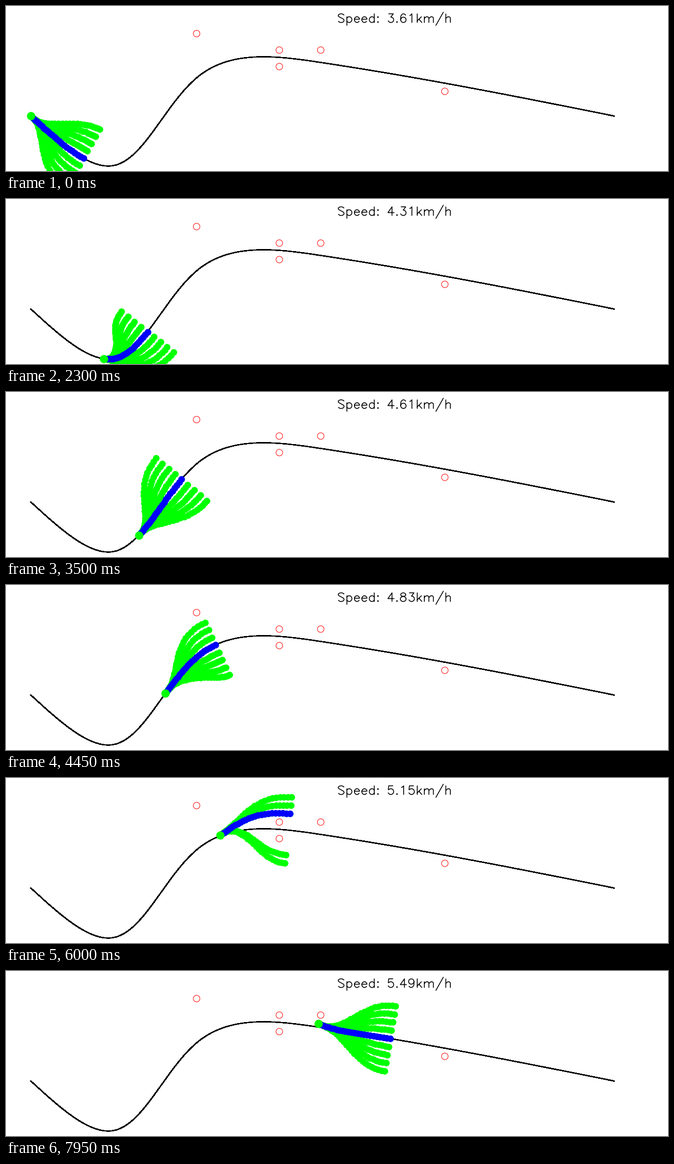
Write a matplotlib script that moves like this. It is 1280x320 px and loops after 8000 ms.

```python
"""Frenet-frame path planner driving along a spline course past obstacles."""
import math

import matplotlib.pyplot as plt
import numpy as np
from matplotlib.animation import FuncAnimation
from numpy.polynomial import Polynomial

W, H, DPI = 1280, 320, 100
FRAMES, INTERVAL = 160, 50
SCALE = 16                      # pixels per metre
ORIGIN = (48, 213.4)

DT, HORIZON = 0.2, 5.0          # seconds
START_SPEED, TARGET_SPEED = 1.0, 2.0
OFFSETS = range(-4, 5)          # lateral targets in metres
CLEARANCE = 1.0
JERK_WEIGHT = 0.1

WAYPOINTS = np.array([(0, 0), (10, -6), (20.5, 5), (35, 6.5), (70.5, 0)])
OBSTACLES = np.array([(20, 10), (30, 6), (30, 8), (35, 8), (50, 3)])
TIMES = np.arange(25) * DT


# ---- course ----

class Course:
    """Natural cubic spline through points, parametrised by chord length."""

    def __init__(self, points):
        h = np.hypot(*np.diff(points, axis=0).T)
        self.knots = np.concatenate([[0], np.cumsum(h)])
        n = len(points)
        slope = np.diff(points, axis=0) / h[:, None]
        m = np.eye(n)
        rhs = np.zeros((n, 2))
        for i in range(1, n - 1):
            m[i, i - 1:i + 2] = h[i - 1], 2 * (h[i - 1] + h[i]), h[i]
            rhs[i] = 3 * (slope[i] - slope[i - 1])
        self.a = points
        self.c = np.linalg.solve(m, rhs)
        self.b = slope - h[:, None] * (2 * self.c[:-1] + self.c[1:]) / 3
        self.d = np.diff(self.c, axis=0) / (3 * h[:, None])

    def at(self, s, offset=0.0):
        """Points at distance s, shifted to the left by offset."""
        i = np.clip(np.searchsorted(self.knots, s, side="right") - 1,
                    0, len(self.b) - 1)
        u = (s - self.knots[i])[:, None]
        a, b, c, d = self.a[i], self.b[i], self.c[i], self.d[i]
        pos = a + u * (b + u * (c + u * d))
        tangent = b + u * (2 * c + 3 * u * d)
        yaw = np.arctan2(tangent[:, 1], tangent[:, 0])
        normal = np.column_stack([-np.sin(yaw), np.cos(yaw)])
        return pos + normal * np.reshape(offset, (-1, 1))


# ---- planner ----

def lateral_poly(d, vel, acc, goal):
    """Quintic from the current lateral state to rest at goal."""
    t = HORIZON
    m = [[t**3, t**4, t**5],
         [3 * t**2, 4 * t**3, 5 * t**4],
         [6 * t, 12 * t**2, 20 * t**3]]
    rhs = [goal - d - vel * t - acc * t * t / 2, -vel - acc * t, -acc]
    return Polynomial([d, vel, acc / 2, *np.linalg.solve(m, rhs)])


def forward_poly(s, speed):
    """Quartic that reaches the target speed at the horizon."""
    gain = TARGET_SPEED - speed
    return Polynomial([s, speed, 0, gain / HORIZON**2, -gain / (2 * HORIZON**3)])


def is_free(path):
    gaps = np.linalg.norm(path[:, None] - OBSTACLES, axis=2)
    return gaps.min() > CLEARANCE


def plan(course, s, speed, lateral):
    """Return the forward curve, the best lateral curve and all free paths."""
    forward = forward_poly(s, speed)
    stations = forward(TIMES)
    options = []
    for goal in OFFSETS:
        poly = lateral_poly(*lateral, goal)
        shift = poly(TIMES)
        path = course.at(stations, shift)
        if is_free(path):
            jerk = np.sum(poly.deriv(3)(TIMES) ** 2)
            cost = JERK_WEIGHT * jerk + shift[-1] ** 2
            # equal costs go to the left-hand path
            options.append((round(cost, 6), -goal, poly, path))
    best = min(options, key=lambda o: o[:2])
    return forward, best[2], best[3], [o[3] for o in options]


def simulate(course):
    s, speed, lateral = 0.0, START_SPEED, (0.0, 0.0, 0.0)
    steps = []
    for _ in range(FRAMES):
        forward, side, best, paths = plan(course, s, speed, lateral)
        s, speed = forward(DT), forward.deriv()(DT)
        lateral = side(DT), side.deriv()(DT), side.deriv(2)(DT)
        steps.append((best, np.vstack(paths), speed * 3.6))
    return steps


# ---- stroke lettering ----

def arc(cx, cy, rx, ry, start, end):
    a = np.radians(np.linspace(start, end, 15))
    return list(zip(cx + rx * np.cos(a), cy + ry * np.sin(a)))


def turned(strokes):
    return [[(20 - x, 21 - y) for x, y in stroke] for stroke in strokes]


def hump(x):
    return [(x, 10)] + arc(x + 6.5, 10, 4.5, 4, 135, 0) + [(x + 11, 0)]


def dot(y):
    return [(5, y + 1), (4, y), (5, y - 1), (6, y), (5, y + 1)]


SIX = [arc(10.7, 12, 6.7, 9, 40, 180) + arc(10.5, 6.5, 6.5, 6.5, 180, 540)]

# character: (advance, strokes)
GLYPHS = {
    " ": (16, []),
    ".": (10, [dot(1)]),
    ":": (10, [dot(13), dot(1)]),
    "/": (22, [[(20, 25), (2, -7)]]),
    "S": (20, [arc(10, 16.8, 7, 4.2, 17, 235) + arc(10, 5, 7, 5, 55, -155)]),
    "p": (19, [[(4, 14), (4, -7)], arc(9.5, 7, 6.5, 7, 148, -148)]),
    "e": (18, [[(3, 8), (15, 8)] + arc(9.3, 7, 6.3, 7, 8, 325)]),
    "d": (19, [[(15, 21), (15, 0)], arc(9.5, 7, 6.5, 7, 32, 328)]),
    "k": (17, [[(4, 21), (4, 0)], [(14, 14), (4, 4)], [(8, 8), (15, 0)]]),
    "m": (30, [[(4, 14), (4, 0)], hump(4), hump(15)]),
    "h": (19, [[(4, 21), (4, 0)], hump(4)]),
    "0": (20, [arc(10, 10.5, 7, 10.5, 0, 360)]),
    "1": (20, [[(6, 17), (8, 18), (11, 21), (11, 0)]]),
    "2": (20, [arc(10, 16, 6, 5, 180, -35) + [(3, 0), (17, 0)]]),
    "3": (20, [[(5, 21), (16, 21), (10, 13)]
               + arc(10.2, 6.5, 6.8, 6.5, 70, -158)]),
    "4": (20, [[(13, 0), (13, 21), (3, 7), (18, 7)]]),
    "5": (20, [[(15, 21), (5, 21), (4, 12)] + arc(10.1, 7, 6.9, 7, 140, -155)]),
    "6": (20, SIX),
    "7": (20, [[(3, 21), (17, 21), (7, 0)]]),
    "8": (20, [arc(10, 16.6, 6, 4.4, 0, 360), arc(10, 6.1, 7, 6.1, 0, 360)]),
    "9": (20, turned(SIX)),
}


def lettering(text, x, y, size):
    """One polyline for the text, with gaps between the strokes."""
    points = []
    for char in text:
        advance, strokes = GLYPHS[char]
        for stroke in strokes:
            points += [(x + px * size, y - py * size) for px, py in stroke]
            points.append((math.nan, math.nan))
        x += advance * size
    return np.array(points)


# ---- drawing ----

def px(width):
    return width * 72 / DPI


def to_screen(points):
    return np.asarray(points) * (SCALE, -SCALE) + ORIGIN


fig = plt.figure(figsize=(W / DPI, H / DPI), dpi=DPI, facecolor="white")
ax = fig.add_axes([0, 0, 1, 1])
ax.set(xlim=(0, W), ylim=(H, 0))
ax.axis("off")


def dots(color, diameter, z):
    return ax.plot([], [], "o", color=color, ms=px(diameter), mew=0,
                   antialiased=False, zorder=z)[0]


course = Course(WAYPOINTS)
steps = simulate(course)

ax.plot(*to_screen(course.at(np.arange(0, course.knots[-1], 0.1))).T,
        color="black", lw=px(1.6), antialiased=False, zorder=1)
ax.plot(*to_screen(OBSTACLES).T, "o", mfc="none", mec="red",
        ms=px(12.8), mew=px(1), zorder=5)

fan = dots("lime", 12.8, 2)
chosen = dots("blue", 12.8, 3)
car = dots("lime", 16, 4)
label, = ax.plot([], [], color="black", lw=px(1.6), zorder=6,
                 solid_capstyle="round", solid_joinstyle="round")


def draw(i):
    best, paths, speed = steps[i]
    fan.set_data(*to_screen(paths).T)
    chosen.set_data(*to_screen(best).T)
    car.set_data(*to_screen(best[:1]).T)
    shown = math.floor(speed * 100) / 100
    label.set_data(*lettering(f"Speed: {shown:.2f}km/h", W / 2, 32, 0.8).T)
    return fan, chosen, car, label


anim = FuncAnimation(fig, draw, frames=FRAMES, interval=INTERVAL,
                     repeat=True, repeat_delay=0)
plt.show()
```
